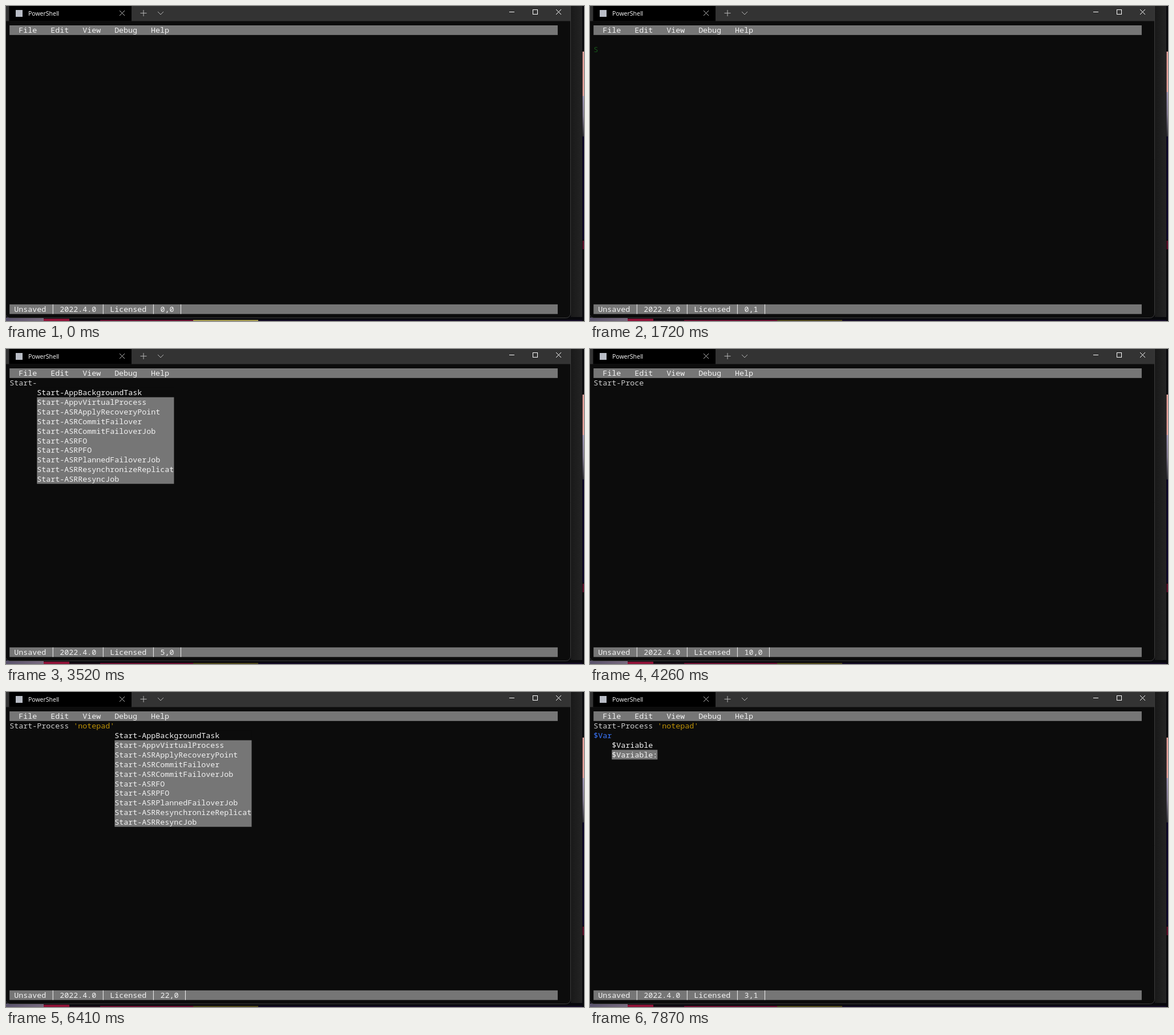
Animation of 1013 by 553 pixels, one loop 8 s. Source, as an HTML page with a canvas:

```html
<!DOCTYPE html>
<html lang="en">
<head>
<meta charset="utf-8">
<title>Terminal editor</title>
<style>
  html, body { margin: 0; width: 100%; height: 100%; overflow: hidden; background: #0c0c0c; }
  canvas { display: block; }
</style>
</head>
<body>
<canvas id="stage" width="1013" height="553"></canvas>
<script>
const ctx = document.getElementById('stage').getContext('2d');
const LOOP = 8000;
const LEFT = 6.2, TOP = 34, COL = 8.006, ROW = 16.89;
const MONO = '500 13.34px "Noto Sans Mono", "DejaVu Sans Mono", monospace';
const BLACK = '#0c0c0c', GREY = '#767676', WHITE = '#f2f2f2', PLAIN = '#cccccc';
const GREEN = '#17561a', YELLOW = '#bb9006', RED = '#c50f1f', BLUE = '#3b78ff';

const getItems = ['Acl', 'ADAccountAuthorizationGroup', 'ADAccountResultantPasswordReplicationPolicy',
  'ADAuthenticationPolicy', 'ADAuthenticationPolicySilo', 'ADCentralAccessPolicy', 'ADCentralAccessRule',
  'ADClaimTransformPolicy', 'ADClaimType', 'ADComputer'].map(s => 'Get-' + s);
const startItems = ['AppBackgroundTask', 'AppvVirtualProcess', 'ASRApplyRecoveryPoint', 'ASRCommitFailover',
  'ASRCommitFailoverJob', 'ASRFO', 'ASRPFO', 'ASRPlannedFailoverJob',
  'ASRResynchronizeReplicationJob', 'ASRResyncJob'].map(s => 'Start-' + s);
const varItems = ['$Variable', '$Variable:'];

// Each step: time, two editor lines, status position, popup items, popup line.
const steps = [];
const add = (at, first, second, pos, items, line = 0) => steps.push({ at, first, second, pos, items, line });

// Types one character per step; the status trails the caret by one.
function type(base, chars, times, items) {
  chars.forEach((c, i) => {
    base += c;
    add(times[i], base, '', base.length - 1 + ',0', i === chars.length - 1 ? items : null);
  });
  return base;
}

add(0, '', '', '0,0');
add(990, '', '', '0,0', getItems, 1);
add(1720, '', 'S', '0,1');
add(2120, '', 'S', '1,1');
add(2380, '', '', '1,1', getItems, 1);
add(2580, '', '', '0,1', getItems);
type('', ['S', 't', 'a', 'r'], [2840, 2920, 3000, 3090], null);
add(3170, 'Start-', '', '4,0', getItems);
add(3520, 'Start-', '', '5,0', startItems);
let line = type('Start-', [...'Process '], [3920, 3990, 4050, 4190, 4260, 4320, 4520, 4590], startItems);
line = type(line, ["'"], [4860], startItems);
line = type(line, ['n', 'o', 't', 'e', 'p', 'ad'], [5650, 5850, 5930, 6020, 6100, 6190], null);
line = type(line, ["'"], [6410], startItems);
add(6810, line, '', '23,0', startItems, 1);
add(7470, line, '$', '0,1', startItems, 1);
add(7670, line, '$V', '1,1');
add(7870, line, '$Var', '3,1', varItems, 1);

function box(x, y, w, h, color) {
  ctx.fillStyle = color;
  ctx.fillRect(x, y, w, h);
}

function stroke(points, color) {
  ctx.strokeStyle = color;
  ctx.lineWidth = 1;
  ctx.beginPath();
  points.forEach(([x, y, jump]) => jump ? ctx.moveTo(x, y) : ctx.lineTo(x, y));
  ctx.stroke();
}

function cross(x, y, r, color) {
  stroke([[x - r, y - r, 1], [x + r, y + r], [x + r, y - r, 1], [x - r, y + r]], color);
}

function fade(x0, y0, x1, y1, ...colors) {
  const g = ctx.createLinearGradient(x0, y0, x1, y1);
  colors.forEach((c, i) => g.addColorStop(i / (colors.length - 1), c));
  return g;
}

const rowTop = row => TOP + row * ROW;

function fillCells(col, row, cols, rows, color) {
  box(LEFT + col * COL, rowTop(row), cols * COL, rows * ROW, color);
}

function print(str, col, row, color) {
  ctx.font = MONO;
  ctx.fillStyle = color;
  ctx.fillText(str, LEFT + col * COL, rowTop(row) + 13.3);
}

function drawDesktop(t) {
  const early = t < 990;
  box(0, 0, 1013, 553, '#08080c');
  box(990, 0, 20, 546, fade(990, 0, 1010, 0, '#191919', '#242424'));
  const split = early ? 158 : 151;
  box(1010.5, 80, 2.5, split - 80, '#eaa49e');
  box(1010.5, split, 2.5, 229 - split, fade(0, split, 0, 229, '#a49ab8', '#857d92', '#303036'));
  box(1010.5, 229, 2.5, 181, '#0a0428');
  box(1010.5, 412, 2.5, 15, '#5c0d28');

  box(0, 547, 66, 6, fade(0, 0, 70, 0, '#5a536c', '#7a6c80'));
  box(66, 549, 45, 4, '#901338');
  box(111, 551, 54, 2, '#22101c');
  box(165, 551, 163, 2, '#6d1032');
  box(328, 551, 114, 2, early ? '#a59a4c' : '#50481c');
  box(442, 551, 568, 2, '#160c28');
}

function drawWindow() {
  ctx.beginPath();
  ctx.roundRect(-1, -10, 990.5, 557.5, 8);
  ctx.fillStyle = BLACK;
  ctx.fill();
  ctx.strokeStyle = '#3c3c3c';
  ctx.lineWidth = 1;
  ctx.stroke();

  box(0, 0, 989, 26.5, '#333333');
  ctx.beginPath();
  ctx.roundRect(5.5, -8, 214.5, 34.5, [8, 8, 0, 0]);
  ctx.fillStyle = '#000000';
  ctx.fill();
  box(17, 7, 12, 12, '#b9bdc6');
  ctx.font = '10.5px "Open Sans", "Noto Sans", sans-serif';
  ctx.fillStyle = '#ffffff';
  ctx.fillText('PowerShell', 39, 17);

  cross(203.5, 12.5, 4.5, '#c0c0c0');
  stroke([[235.5, 12.5, 1], [246.5, 12.5], [241, 7, 1], [241, 18]], '#b4b4b4');
  stroke([[266, 10, 1], [271, 15], [276, 10]], '#b4b4b4');
  stroke([[882, 10.5, 1], [891, 10.5]], '#ffffff');
  ctx.strokeRect(923.5, 6.5, 8, 8);
  cross(968.5, 10.5, 4.5, '#ffffff');
}

function drawBars(pos) {
  fillCells(0, 0, 120, 1, GREY);
  print('  File   Edit   View   Debug   Help', 0, 0, WHITE);
  fillCells(0, 29, 120, 1, GREY);
  let col = 1;
  for (const part of ['Unsaved', '2022.4.0', 'Licensed', pos]) {
    print(part, col, 29, WHITE);
    col += part.length + 1;
    box(LEFT + (col + 0.5) * COL - 0.5, rowTop(29), 1, ROW, WHITE);
    col += 2;
  }
}

function drawCode({ at, first, second }) {
  const quote = first.indexOf("'");
  const command = quote < 0 ? first : first.slice(0, quote);
  const settled = at >= 3520;
  print(command, 0, 1, settled ? PLAIN : GREEN);
  if (quote >= 0) {
    const str = first.slice(quote);
    const open = str.length === 1 || !str.endsWith("'");
    if (open) fillCells(quote, 1, str.length, 1, RED);
    print(str, quote, 1, YELLOW);
  }
  const color = second === '$' ? PLAIN : second[0] === '$' ? BLUE : GREEN;
  print(second, 0, 2, color);
}

function drawPopup({ first, second, items, line }) {
  if (!items) return;
  const col = (line ? second : first).length;
  const top = line + 2;
  const width = Math.min(30, Math.max(...items.map(s => s.length)));
  fillCells(col, top, width, 1, BLACK);
  fillCells(col, top + 1, width, items.length - 1, GREY);
  items.forEach((item, i) => print(item.slice(0, width), col, top + i, WHITE));
}

function draw(t) {
  const step = steps.findLast(s => s.at <= t);
  drawDesktop(t);
  drawWindow();
  drawBars(step.pos);
  drawCode(step);
  drawPopup(step);
}

const begin = performance.now();
function tick() {
  draw((performance.now() - begin) % LOOP);
  requestAnimationFrame(tick);
}
tick();
</script>
</body>
</html>
```
